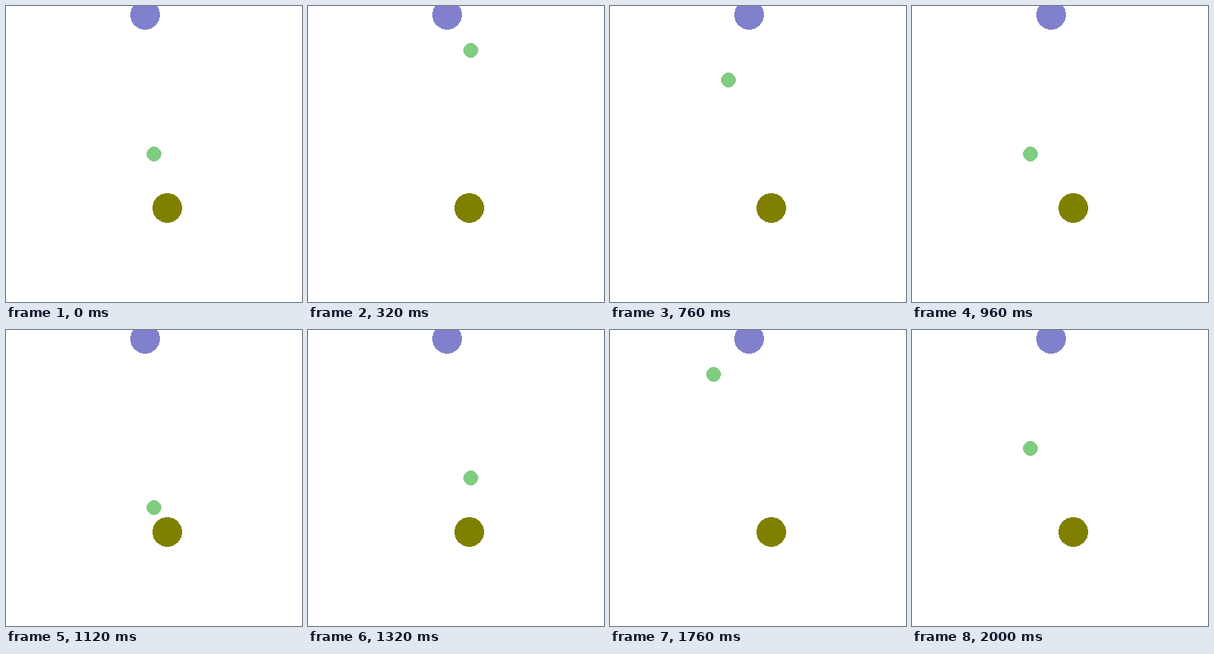
These frames come from a looping animation (400 px wide and 400 px high, 2.08 s). An HTML page:

```html
<!DOCTYPE html>
<html lang="en">
<head>
<meta charset="utf-8">
<title>Walking dot</title>
<style>
  html, body { margin: 0; width: 100%; height: 100%; overflow: hidden; background: #fff; }
  svg { display: block; width: 400px; height: 400px; }
</style>
</head>
<body>
<svg viewBox="0 0 400 400" shape-rendering="crispEdges">
  <circle id="dot" cx="200" cy="200" r="10" fill="#80cc80"/>
  <circle cx="188" cy="12" r="20" fill="#8080cc"/>
  <circle cx="218" cy="273" r="20" fill="#808000"/>
</svg>
<script>
  const STEP = 40, LOOP = 2080, CELL = 20;
  const moves = { R: [1, 0], L: [-1, 0], U: [0, -1], D: [0, 1] };

  // Each entry is a direction and a number of cells.
  const route = "R1 U8 R1 L5 R1 D10 R3 D1 U10 L4 R1 D5";
  const path = [[200, 200]];
  for (const leg of route.split(" ")) {
    const [dx, dy] = moves[leg[0]];
    for (let n = +leg.slice(1); n > 0; n--) {
      const [x, y] = path[path.length - 1];
      path.push([x + dx * CELL, y + dy * CELL]);
    }
  }

  const dot = document.getElementById("dot");
  const start = performance.now();

  function draw() {
    const time = (performance.now() - start) % LOOP;
    const [x, y] = path[Math.min(Math.floor(time / STEP), path.length - 1)];
    dot.setAttribute("cx", x);
    dot.setAttribute("cy", y);
    requestAnimationFrame(draw);
  }
  draw();
</script>
</body>
</html>
```
